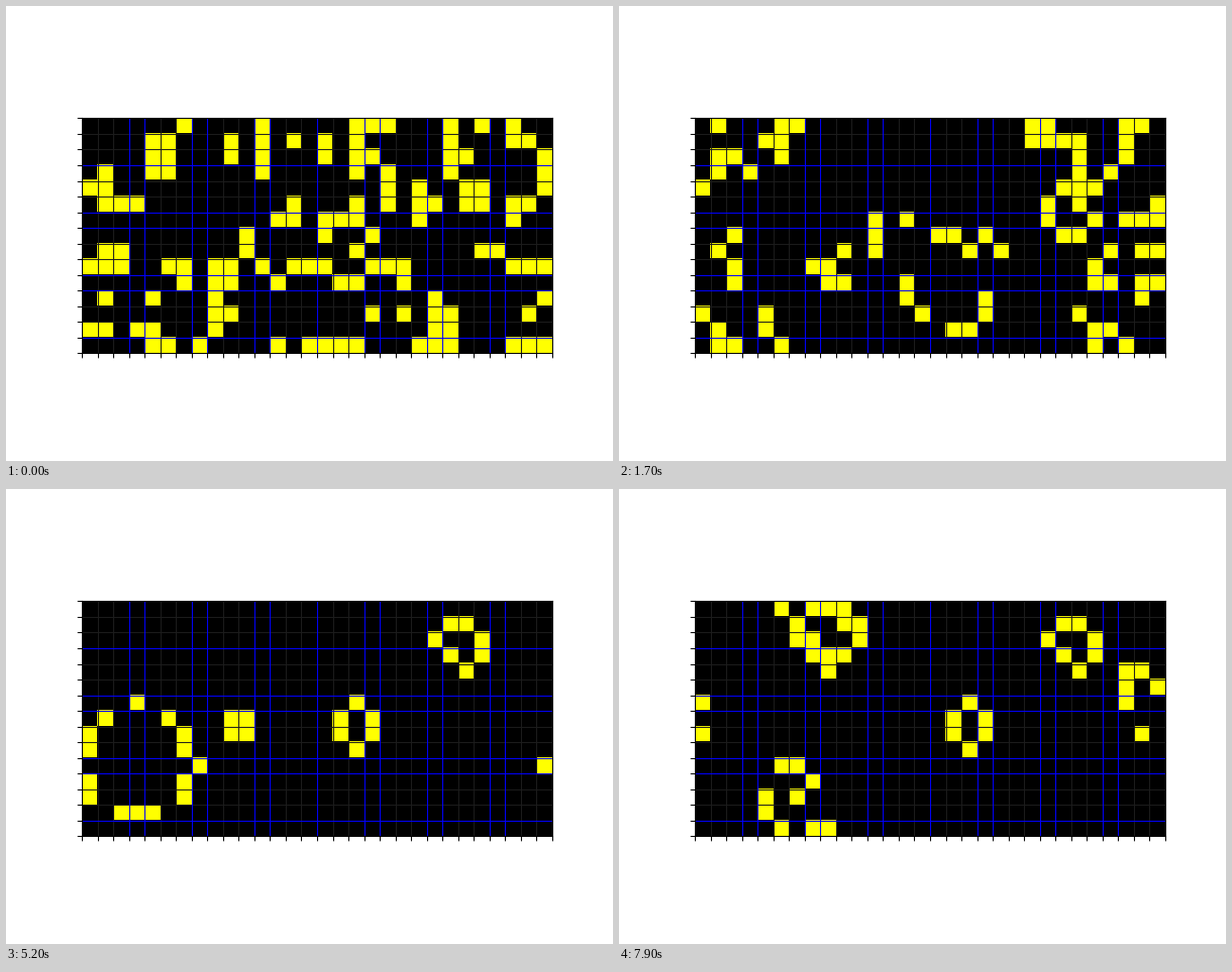
Write a matplotlib script that moves like this. It is 640 by 480 pixels and loops after 8000 ms.

```python
import numpy as np
import matplotlib.pyplot as plt
from matplotlib.animation import FuncAnimation
from matplotlib.colors import ListedColormap

ROWS, COLS = 15, 30
FRAMES, STEP_MS = 80, 100

# Live columns of each row in the first generation
START = [
    [6, 11, 17, 18, 19, 23, 25, 27],
    [4, 5, 9, 11, 13, 15, 17, 23, 27, 28],
    [4, 5, 9, 11, 15, 17, 18, 23, 24, 29],
    [1, 4, 5, 11, 17, 19, 23, 29],
    [0, 1, 19, 21, 24, 25, 29],
    [1, 2, 3, 13, 17, 19, 21, 22, 24, 25, 27, 28],
    [12, 13, 15, 16, 17, 21, 27],
    [10, 15, 18],
    [1, 2, 10, 17, 25, 26],
    [0, 1, 2, 5, 6, 8, 9, 11, 13, 14, 15, 18, 19, 20, 27, 28, 29],
    [6, 8, 9, 12, 16, 17, 20],
    [1, 4, 8, 22, 29],
    [8, 9, 18, 20, 22, 23, 28],
    [0, 1, 3, 4, 8, 22, 23],
    [4, 5, 7, 12, 14, 15, 16, 17, 21, 22, 23, 27, 28, 29],
]


def next_generation(world):
    """One step of the Game of Life on a torus."""
    near = sum(np.roll(world, (dy, dx), (0, 1))
               for dy in (-1, 0, 1) for dx in (-1, 0, 1) if dy or dx)
    return ((near == 3) | ((world == 1) & (near == 2))).astype(int)


world = np.zeros((ROWS, COLS), int)
for row, cols in enumerate(START):
    world[row, cols] = 1
history = [world]
while len(history) < FRAMES:
    history.append(next_generation(history[-1]))

fig, ax = plt.subplots(figsize=(6.4, 4.8), dpi=100)
image = ax.imshow(world, cmap=ListedColormap(["black", "yellow"]),
                  vmin=0, vmax=1, interpolation="nearest")
ax.set_xticks(np.arange(COLS + 1) - 0.5, labels=[])
ax.set_yticks(np.arange(ROWS + 1) - 0.5, labels=[])


def line_color(pixel):
    """Grid lines on even pixels are blue, the others nearly black."""
    return "blue" if int(pixel + 0.5) % 2 == 0 else "#1c1c1c"


LEFT, TOP, CELL = 80, 118.4, 496 / COLS
lines = [(ax.axvline, LEFT, COLS), (ax.axhline, TOP, ROWS)]
for draw, origin, count in lines:
    for k in range(1, count):
        color = line_color(origin + k * CELL)
        draw(k - 0.5, color=color, lw=0.8,
             zorder=2.2 if color == "blue" else 2.1)


def update(i):
    image.set_data(history[i])
    return (image,)


anim = FuncAnimation(fig, update, frames=FRAMES, interval=STEP_MS,
                     repeat=True, repeat_delay=0, blit=False)
plt.show()
```
